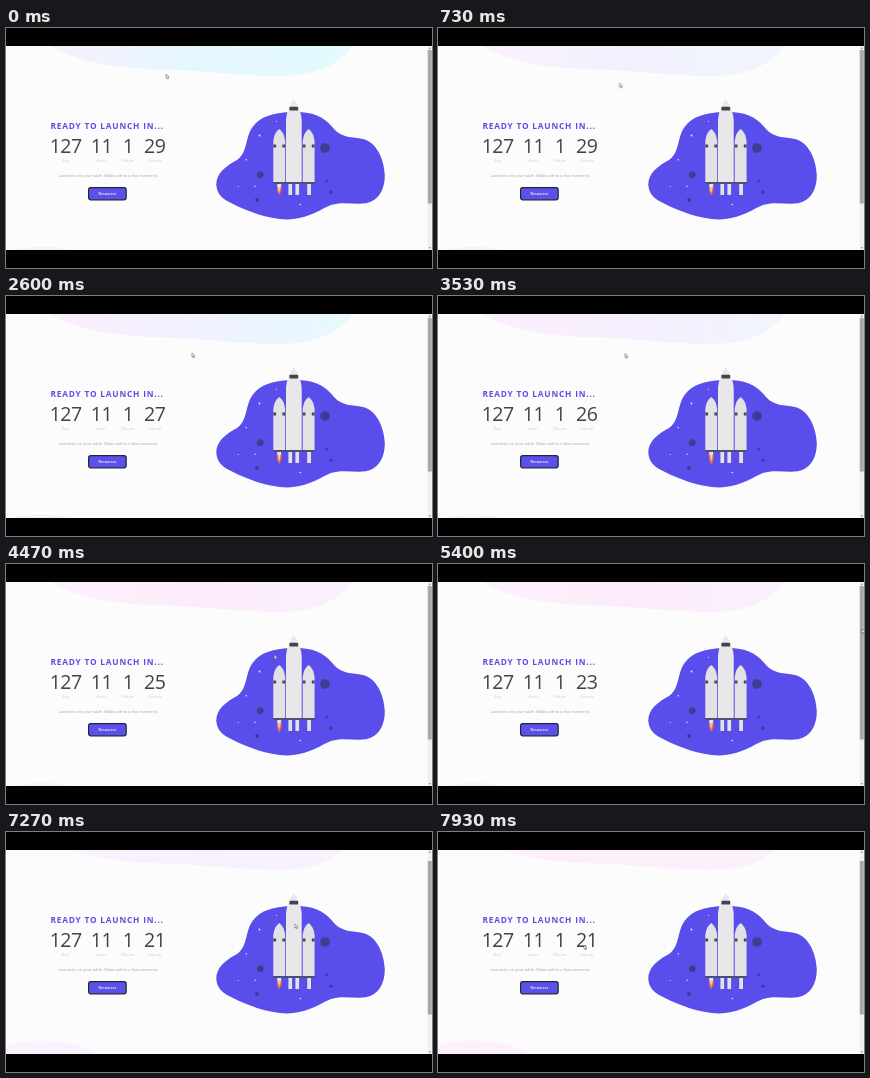
Recreate the animation shown at these times as an HTML page. Size 426x240 px, loop 8 s.

```html
<!DOCTYPE html>
<html lang="en">
<head>
<meta charset="utf-8">
<title>Launch countdown</title>
<style>
  html, body { margin: 0; width: 100%; height: 100%; overflow: hidden; background: #000; }
  svg { display: block; width: 100vw; height: 100vh; font-family: "Open Sans", "Noto Sans", sans-serif; }
  svg * { animation-duration: 8s; animation-iteration-count: infinite; animation-timing-function: linear; }

  .title { font-size: 8.3px; font-weight: 700; letter-spacing: .8px; fill: #594ee2; }
  .digits { font-size: 19.6px; letter-spacing: -.5px; fill: #444; text-anchor: middle; }
  .labels { font-size: 3.4px; fill: #c9c9c4; text-anchor: middle; }
  .note { font-size: 4px; fill: #a2a2a2; }
  .button { font-size: 3.6px; font-weight: 600; fill: #fff; text-anchor: middle; }

  .page { animation-name: scroll; }
  @keyframes scroll {
    0%, 70% { transform: translateY(0); }
    80%, 82.5% { transform: translateY(-9px); }
    86%, 100% { transform: translateY(-10px); }
  }
  .thumb { fill: #a9a9a9; animation-name: slide, grab; }
  @keyframes slide {
    0%, 70% { transform: translateY(0); }
    80%, 82.5% { transform: translateY(6px); }
    86%, 100% { transform: translateY(7px); }
  }
  @keyframes grab {
    0%, 69% { fill: #a9a9a9; }
    69.1%, 87% { fill: #6c6c6c; }
    87.1%, 100% { fill: #a9a9a9; }
  }
  .cursor { animation-name: point; }
  @keyframes point {
    0% { transform: translate(160px, 46px); }
    11%, 44% { transform: translate(186px, 57px); }
    56% { transform: translate(269px, 91px); }
    66%, 70% { transform: translate(424px, 65px); }
    82%, 87% { transform: translate(424px, 72px); }
    95%, 100% { transform: translate(146px, 113px); }
  }

  /* One tick every 900 ms, hard cuts */
  .seconds { animation-name: tick; animation-timing-function: step-end !important; }
  @keyframes tick {
    0% { transform: translateY(0); }
    11.125% { transform: translateY(-30px); }
    22.375% { transform: translateY(-60px); }
    33.625% { transform: translateY(-90px); }
    44.875% { transform: translateY(-120px); }
    56.125% { transform: translateY(-150px); }
    67.375% { transform: translateY(-180px); }
    78.625% { transform: translateY(-210px); }
    89.875%, 100% { transform: translateY(-240px); }
  }

  .left { animation-name: tint-left; }
  .mid { animation-name: tint-mid; }
  .right { animation-name: tint-right; }
  @keyframes tint-left {
    0% { stop-color: #f7f0fd; } 18% { stop-color: #fdf1fd; } 32% { stop-color: #fcedfc; }
    56%, 68% { stop-color: #fdf0fc; } 82% { stop-color: #f8f3ff; } 100% { stop-color: #fcf0fc; }
  }
  @keyframes tint-mid {
    0% { stop-color: #e4f7fe; } 18% { stop-color: #fdebfc; } 32% { stop-color: #f0f1ff; }
    56%, 68% { stop-color: #fcecfb; } 82% { stop-color: #f5f1ff; } 100% { stop-color: #fdeefb; }
  }
  @keyframes tint-right {
    0% { stop-color: #e4fafd; } 18% { stop-color: #fdf0fc; } 32% { stop-color: #e5fafd; }
    56%, 68% { stop-color: #faf0fe; } 82% { stop-color: #f5f4ff; } 100% { stop-color: #fcf0fd; }
  }

  .flame { transform-origin: 273px 160px; animation-name: flicker; animation-duration: .4s; animation-direction: alternate; }
  @keyframes flicker { from { transform: scaleY(.85); } to { transform: scaleY(1.1); } }
</style>
</head>
<body>
<svg viewBox="0 0 426 240">
  <defs>
    <linearGradient id="tint" gradientUnits="userSpaceOnUse" x1="40" y1="0" x2="345" y2="0">
      <stop class="left" offset="0"/>
      <stop class="mid" offset=".5"/>
      <stop class="right" offset="1"/>
    </linearGradient>
    <clipPath id="view"><rect y="18" width="426" height="204"/></clipPath>
    <clipPath id="slot"><rect x="132" y="106" width="34" height="23"/></clipPath>
    <g id="booster" fill="#e2e2e4">
      <path d="M267.3 155V113Q268.5 104 273.2 101Q278 104 279.2 113V155Z"/>
      <path fill="#494853" d="M267.3 116.5h2.8v3h-2.8zM276.4 116.5h2.8v3h-2.8z"/>
    </g>
  </defs>

  <rect width="426" height="240"/>
  <g clip-path="url(#view)">
    <rect y="18" width="426" height="204" fill="#fcfcfd"/>

    <g class="page">
      <g fill="url(#tint)">
        <path d="M28 8C55 28 90 39 145 41C195 42 220 47 270 48C315 48 328 36 342 24L350 8Z"/>
        <path d="M0 225C12 218 42 217 62 221S96 233 112 238H0Z"/>
      </g>

      <text class="title" x="44.5" y="101.3">READY TO LAUNCH IN...</text>
      <g class="digits">
        <text x="59.7" y="125.4">127</text>
        <text x="95.5" y="125.4">11</text>
        <text x="122" y="125.4">1</text>
        <g clip-path="url(#slot)"><g class="seconds" id="seconds"></g></g>
      </g>
      <g class="labels">
        <text x="59.7" y="134.2">Days</text>
        <text x="95.5" y="134.2">Hours</text>
        <text x="122" y="134.2">Minutes</text>
        <text x="148.8" y="134.2">Seconds</text>
      </g>
      <text class="note" x="52.5" y="149.3">Launches on your table. Made within a few moments.</text>
      <rect x="82.6" y="159.6" width="37.6" height="12.2" rx="2.2" fill="#5b50ea" stroke="#25243a" stroke-width="1.2"/>
      <text class="button" x="101.4" y="167">Resources</text>

      <path fill="#594eeb" d="M210.3 157C210 145 220 138 231 132C243 124 238 106 250 95C260 85 278 83.5 294 84C312 85 321 92 328 101C336 110 346 109 357 111C370 114 378 130 378.8 147C379 162 372 173 360 175.3C348 177 337 173 325 177C313 182 303 190.5 281 191.5C261 191 241 183 227 176C216 171 211 166 210.3 157Z"/>
      <g fill="#423b91">
        <circle cx="319" cy="120" r="4.8"/>
        <circle cx="254.3" cy="146.7" r="3.4"/>
        <circle cx="251" cy="172" r="1.9"/>
        <circle cx="325" cy="164.3" r="1.8"/>
        <circle cx="320.7" cy="153" r="1.5"/>
      </g>
      <g fill="#e6e4ff">
        <circle cx="253.5" cy="107.5" r=".9"/>
        <circle cx="240.3" cy="131.7" r=".8"/>
        <circle cx="232.3" cy="158.5" r=".6"/>
        <circle cx="249" cy="158.3" r=".7"/>
        <circle cx="294.3" cy="176.5" r=".8"/>
        <circle cx="270.5" cy="93.5" r=".6"/>
      </g>

      <path fill="#e2e2e4" d="M271.2 156h4v4h-4zM282.4 156h3.7v11h-3.7zM289.4 156h3.7v11h-3.7zM301.2 156h3.8v11h-3.8z"/>
      <g class="flame">
        <path fill="#ee7048" d="M271 159H275.4Q276 164 273.2 168Q270.4 164 271 159Z"/>
        <path fill="#ffd38a" d="M272.2 159H274.3Q274.6 162 273.2 165Q271.9 162 272.2 159Z"/>
      </g>
      <use href="#booster"/>
      <use href="#booster" x="29.4"/>
      <path fill="#e8e8ea" d="M280 155V92Q280.5 84 283.7 79Q285 74.5 287.8 71.5Q290.6 74.5 291.9 79Q295.2 84 295.7 92V155Z"/>
      <rect x="283.4" y="78.8" width="8.8" height="3.8" rx=".8" fill="#45444e"/>
      <rect x="267" y="154" width="42" height="1.8" fill="#514e68"/>
    </g>

    <rect x="421.5" y="18" width="4.5" height="204" fill="#f0f0f0"/>
    <path fill="#777" d="M422.7 20.7L423.8 19.3L424.9 20.7ZM422.7 219.3L423.8 220.7L424.9 219.3Z"/>
    <rect class="thumb" x="421.8" y="22" width="4" height="153.5"/>
    <path class="cursor" d="M0 0V4.2L1 3.3L1.7 4.8L2.4 4.5L1.8 3H3Z" fill="#fff" stroke="#444" stroke-width=".5"/>
  </g>
</svg>
<script>
  const strip = document.getElementById("seconds");
  for (let i = 0; i < 9; i++) {
    const label = document.createElementNS(strip.namespaceURI, "text");
    label.setAttribute("x", 148.7);
    label.setAttribute("y", 125.4 + 30 * i);
    label.textContent = 29 - i;
    strip.append(label);
  }
</script>
</body>
</html>
```
